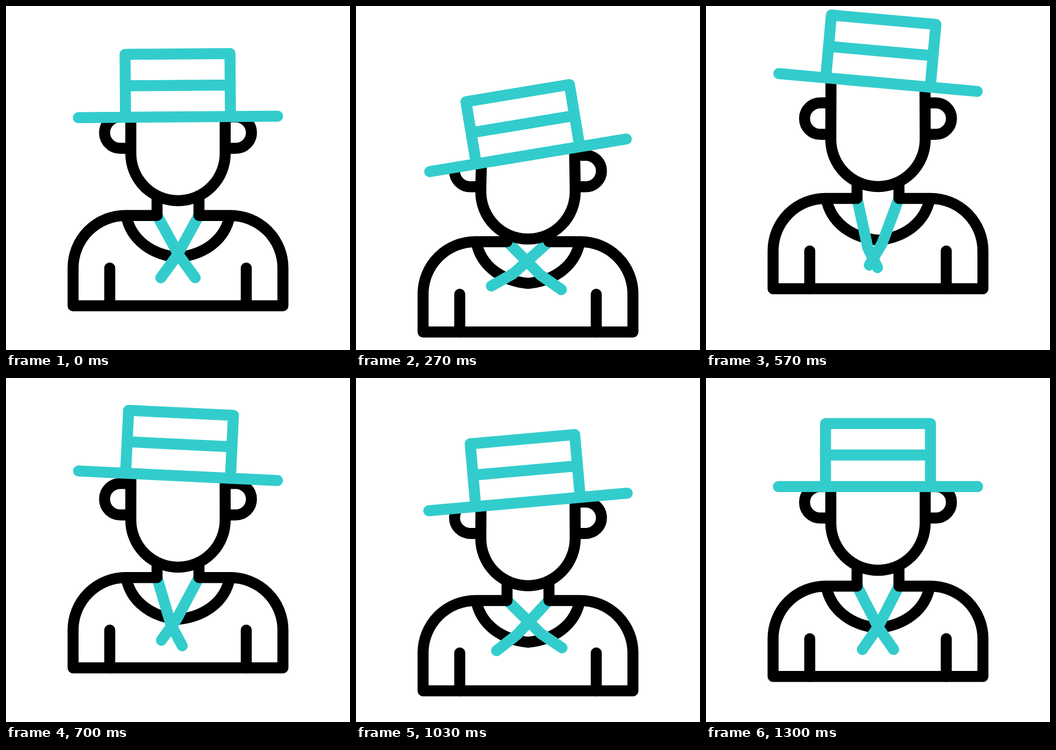
These frames come from a looping animation (640x640 px, 1.67 s). An HTML page:

```html
<!DOCTYPE html>
<html lang="en">
<head>
<meta charset="utf-8">
<title>Bouncing man in a boater hat</title>
<style>
  html, body { margin: 0; width: 100%; height: 100%; overflow: hidden; background: #fff; }
  svg { display: block; width: 100vw; height: 100vh; }
  path { fill: none; stroke: #000; stroke-width: 20.5; stroke-linejoin: round; }
  .round path { stroke-linecap: round; }
  .teal path { stroke: #3cc; }
  path.cover { fill: #fff; stroke: none; }
  #collar { stroke-linejoin: miter; }
  #face { fill: #fff; }
</style>
</head>
<body>
<svg viewBox="0 0 640 640">
  <g id="body">
    <path id="collar" d="M223.5 387C232 432 270 460 320 465C370 460 408 432 416.5 387"/>
    <g class="teal round"><path id="scarfA"/><path id="scarfB"/></g>
    <path d="M281 350V387.3H222.3A97.5 97.5 0 0 0 124.8 484.8V555.3H515.2V484.8A97.5 97.5 0 0 0 417.7 387.3H359V350"/>
    <g class="round"><path d="M193 485V555.3M447 485V555.3"/></g>
  </g>
  <path id="face"/>
  <g id="ears">
    <path d="M232.2 202H212.6A29.25 29.25 0 0 0 212.6 260.5H232.2M407.8 202H427.4A29.25 29.25 0 0 1 427.4 260.5H407.8"/>
  </g>
  <g id="hat" class="teal round">
    <path class="cover" d="M125 202V85H515V202Z"/>
    <path d="M222.4 202V84.8H417.6V202M222.4 143.3H417.6M134.7 202H505.3"/>
  </g>
</svg>
<script>
const LOOP = 1670, FPS = 30, START = -1.25, END = 39;

const $ = id => document.getElementById(id);
const ease = u => u * u * (3 - 2 * u);

// Eased motion from rest through the given [frame, value] peaks and back to rest
function track(...peaks) {
  const keys = [[START, 0], ...peaks, [END, 0]];
  return f => {
    const i = keys.findIndex(k => k[0] > f);
    if (i < 1) return 0;
    const [f0, v0] = keys[i - 1], [f1, v1] = keys[i];
    return v0 + (v1 - v0) * ease((f - f0) / (f1 - f0));
  };
}

const body = track([8.2, 51.2], [17.5, -30], [28.7, 30.5]);
const head = track([7.4, 76.8], [17.5, -22.5], [27.5, 36.8]);
const lift = track([8.4, 0], [16.8, -38], [24, 0]);
const tilt = track([8.5, -9.5], [18, 5.6], [27.5, -6.5]);
const swingA = track([6, 38], [18.6, -33], [28.1, 41.5]);
const swingB = track([6.5, 42], [17.3, -13], [27.6, 37.5]);

function move(id, y, turn = 0) {
  $(id).setAttribute("transform", `translate(0 ${y}) rotate(${turn} 320 202)`);
}

// The tip swings along a parabola and the bend follows it; side mirrors the strand
function strand(id, side, swing) {
  const x = d => 320 + side * d;
  const bendY = 465 - 0.47 * swing;
  const tipY = 505 - 0.6 * swing - 0.0077 * swing * swing;
  $(id).setAttribute("d",
    `M${x(-39)} 387L${x(1 + 0.67 * swing)} ${bendY}L${x(29 + swing)} ${tipY}`);
}

function draw(f) {
  const headY = head(f), hatY = headY + lift(f), turn = tilt(f);
  const rad = turn * Math.PI / 180, brim = 202 + hatY;
  const dx = 87.8 * Math.cos(rad), dy = 87.8 * Math.sin(rad);

  move("body", body(f));
  move("ears", headY);
  move("hat", hatY, turn);
  // The temples stay attached to the hat
  $("face").setAttribute("d",
    `M${320 - dx} ${brim - dy}L232.2 ${260 + headY}v10a87.8 87.8 0 0 0 175.6 0v-10L${320 + dx} ${brim + dy}`);
  strand("scarfA", 1, swingA(f));
  strand("scarfB", -1, swingB(f));
}

const start = performance.now();
function tick() {
  const t = Math.max(0, performance.now() - start) % LOOP;
  draw(Math.floor(t * FPS / 1000 + 0.101));
  requestAnimationFrame(tick);
}
tick();
</script>
</body>
</html>
```
